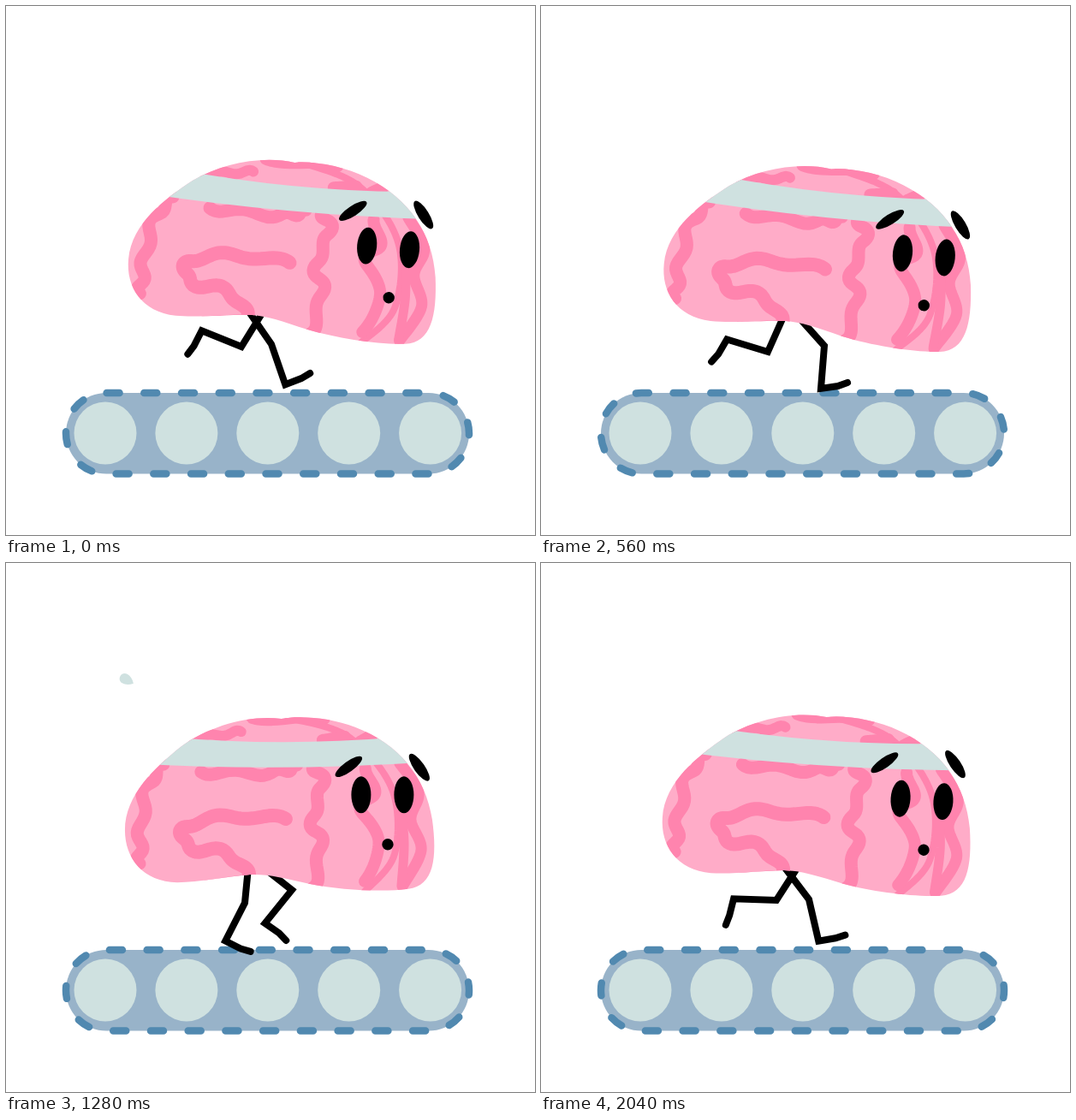
These frames come from a looping animation (618 px wide and 618 px high, 2080 ms). An HTML page with a canvas:

```html
<!DOCTYPE html>
<html>
<head>
<meta charset="utf-8">
<style>
html, body { margin: 0; width: 100%; height: 100%; overflow: hidden; background: #fff; }
canvas { display: block; width: 618px; height: 618px; }
</style>
</head>
<body>
<canvas id="stage" width="618" height="618"></canvas>
<script>
const ctx = document.getElementById('stage').getContext('2d');
const LOOP = 2080, STEP = 520, STRIDE = 1040, TICK = 40, RAD = Math.PI / 180;
const PINK = '#ffacc8', ROSE = '#ff84ae', PALE = '#cfe1e0', BLUE = '#98b3c9', DASH = '#5189b0';

function hermite(b, c, m0, m1, u) {
  const u2 = u * u, u3 = u2 * u;
  return b * (2 * u3 - 3 * u2 + 1) + m0 * (u3 - 2 * u2 + u) + c * (3 * u2 - 2 * u3) + m1 * (u3 - u2);
}

// Periodic smooth interpolation through rows of [time, ...values]
function track(rows, period, time) {
  const n = rows.length;
  const t = ((time % period) + period) % period;
  const at = i => {
    const wrap = Math.floor(i / n), row = rows[i - wrap * n];
    return [row[0] + wrap * period, ...row.slice(1)];
  };
  let i = n - 1;
  while (rows[i][0] > t) i--;
  const [a, b, c, d] = [at(i - 1), at(i), at(i + 1), at(i + 2)];
  const span = c[0] - b[0];
  return b.slice(1).map((v, k) => {
    const j = k + 1;
    const m0 = (c[j] - a[j]) / (c[0] - a[0]) * span;
    const m1 = (d[j] - b[j]) / (d[0] - b[0]) * span;
    return hermite(v, c[j], m0, m1, (t - b[0]) / span);
  });
}

function ellipse(x, y, rx, ry, color, angle = 0) {
  ctx.fillStyle = color;
  ctx.beginPath();
  ctx.ellipse(x, y, rx, ry, angle * RAD, 0, 7);
  ctx.fill();
}

// Body height, and how far the brows lag behind
const BOB = [[0, 0], [40, 7.5], [95, 12], [160, 9], [240, 0], [340, -6], [420, -6], [480, -2.5]];
const LAG = [[0, 0.8], [40, 0.62], [240, 0], [400, 0.75], [480, 1]];
const bob = t => track(BOB, STEP, t)[0];
const tilt = t => 2.3 + 3.7 * Math.cos((t - 52) / STEP * 2 * Math.PI);

// time, knee x, knee y, shin angle, foot angle
const LEG = [
  [0, 310, 395, 19, 111],
  [40, 313, 397, -4.6, 98],
  [140, 306, 403, -25.5, 90],
  [240, 279, 397, -27, 63],
  [340, 266, 388, -55, 25],
  [480, 257, 394, -92, -14],
  [520, 257, 398, -112, -27],
  [560, 265, 404, -107, -30],
  [660, 295, 406, -85, 5],
  [760, 316, 382, -39, 55],
  [880, 319, 374, -8, 80],
  [1000, 313, 393, 13, 100]
];

function drawLeg(t, dx) {
  const [kx, ky, shin, foot] = track(LEG, STRIDE, t);
  const bend = 14 * Math.cos((t - 130) / STRIDE * 2 * Math.PI);
  let x = kx + dx, y = ky;
  ctx.beginPath();
  ctx.moveTo(283 + dx, 356 + bob(t));
  ctx.lineTo(x, y);
  for (const [angle, size] of [[shin, 50], [foot, 20], [foot + bend, 12]]) {
    x += Math.sin(angle * RAD) * size;
    y += Math.cos(angle * RAD) * size;
    ctx.lineTo(x, y);
  }
  ctx.strokeStyle = '#000';
  ctx.lineWidth = 8;
  ctx.lineCap = 'round';
  ctx.lineJoin = 'miter';
  ctx.stroke();
}

// Treadmill
const BELT = { x: 70, y: 452, w: 471, h: 94.5, r: 47.2 };
const LENGTH = 2 * (BELT.w - BELT.h) + 2 * Math.PI * BELT.r;
const PITCH = LENGTH / 24;

function drawBelt(t) {
  const { x, y, w, h, r } = BELT;
  const mid = x + w / 2;
  ctx.beginPath();
  ctx.moveTo(mid, y);
  ctx.arcTo(x, y, x, y + h, r);
  ctx.arcTo(x, y + h, mid, y + h, r);
  ctx.arcTo(x + w, y + h, x + w, y, r);
  ctx.arcTo(x + w, y, mid, y, r);
  ctx.closePath();
  ctx.fillStyle = BLUE;
  ctx.fill();
  ctx.strokeStyle = DASH;
  ctx.lineWidth = 8.5;
  ctx.lineCap = 'round';
  ctx.lineJoin = 'round';
  ctx.setLineDash([15, PITCH - 15]);
  ctx.lineDashOffset = 2 - t / STEP * 2 * PITCH;
  ctx.stroke();
  ctx.setLineDash([]);
  for (let i = 0; i < 5; i++) ellipse(116 + i * 94.9, 499, 36.5, 36.5, PALE);
}

// Sweat drops
const DROPS = [
  { start: 150, life: 250, from: [280, 228], to: [135, 120], angle: 210 },
  { start: 620, life: 280, from: [433, 194], to: [556, 99], angle: -27 },
  { start: 1040, life: 250, from: [281, 214], to: [135, 133], angle: 209 },
  { start: 1520, life: 280, from: [433, 194], to: [545, 107], angle: -27 }
];
const TEAR = new Path2D('M-23 0C-14 -10 -4 -15 6 -15C15 -15 21 -8 21 0C21 8 15 15 6 15C-4 15 -14 10 -23 0Z');

function drawDrop({ start, life, from, to, angle }, t) {
  const u = (t - start) / life;
  if (u < 0 || u >= 1) return;
  const size = 1 - 0.65 * Math.max(0, (u - 0.5) / 0.5);
  const fade = Math.min(1, Math.max(0, (u - 0.6) / 0.3));
  const mix = (a, b) => Math.round(a + (b - a) * fade);
  ctx.save();
  ctx.translate(from[0] + (to[0] - from[0]) * u, from[1] + (to[1] - from[1]) * u);
  ctx.rotate(angle * RAD);
  ctx.scale(size, size);
  ctx.fillStyle = `rgb(${mix(152, 207)},${mix(179, 225)},${mix(201, 224)})`;
  ctx.fill(TEAR);
  ctx.restore();
}

// Brain
const BRAIN = new Path2D('M322 182C345 178 380 181 408 192C460 212 490 250 498 300' +
  'C504 345 500 377 470 381C440 385 390 382 355 375C325 368 305 363 285 364' +
  'C260 366 225 373 200 373C160 372 139 345 139 312C139 270 175 238 205 214C238 190 285 177 322 182Z');
const BAND = new Path2D('M190 203Q320 215 455 204L490 233Q320 244 150 234Z');

// Curve through a few points, with a sideways wobble
function fold(width, amp, waves, pts) {
  const last = pts.length - 1, path = new Path2D();
  const at = i => pts[Math.max(0, Math.min(last, i))];
  const spot = s => {
    const i = Math.min(last - 1, Math.floor(s));
    return [0, 1].map(k => hermite(at(i)[k], at(i + 1)[k],
      (at(i + 1)[k] - at(i - 1)[k]) / 2, (at(i + 2)[k] - at(i)[k]) / 2, s - i));
  };
  const steps = last * 16;
  for (let n = 0; n <= steps; n++) {
    const s = n / 16, [x, y] = spot(s);
    const [px, py] = spot(Math.max(0, s - 0.05)), [qx, qy] = spot(Math.min(last, s + 0.05));
    const dir = Math.atan2(qy - py, qx - px);
    const off = amp * Math.sin(n / steps * waves * 2 * Math.PI);
    path.lineTo(x - Math.sin(dir) * off, y + Math.cos(dir) * off);
  }
  return { width, path };
}

const FOLDS = [
  fold(15, 4, 3.5, [[184, 235], [164, 264], [157, 318], [156, 351]]),
  fold(15, 3, 3, [[228, 244], [310, 245], [340, 236]]),
  fold(15, 4, 4, [[360, 236], [370, 260], [358, 298], [368, 332], [358, 380]]),
  fold(16, 3, 5, [[327, 299], [262, 296], [210, 308], [214, 332], [258, 339], [284, 365]]),
  fold(12, 2, 2, [[218, 205], [275, 197]]),
  fold(14, 2, 1, [[288, 181], [372, 182]]),
  fold(8, 0, 0, [[330, 181], [400, 203], [451, 264], [454, 340], [418, 385]]),
  fold(14, 0, 0, [[370, 207], [396, 203]]),
  fold(14, 0, 0, [[414, 209], [428, 201]]),
  fold(14, 1.5, 3, [[420, 240], [430, 268], [414, 289], [437, 325], [419, 372]]),
  fold(13, 0, 0, [[460, 234], [482, 268], [473, 300], [485, 336], [463, 378]]),
  fold(11, 0, 0, [[459, 270], [465, 325], [462, 376]]),
  fold(5, 0, 0, [[232, 373], [290, 365]])
];

function drawBrain(t) {
  ctx.save();
  ctx.translate(320, 348 + bob(t));
  ctx.rotate(tilt(t) * RAD);
  ctx.translate(-320, -348);

  ctx.save();
  ctx.fillStyle = PINK;
  ctx.fill(BRAIN);
  ctx.clip(BRAIN);
  ctx.strokeStyle = ROSE;
  ctx.lineCap = ctx.lineJoin = 'round';
  for (const { width, path } of FOLDS) {
    ctx.lineWidth = width;
    ctx.stroke(path);
  }
  ctx.fillStyle = PALE;
  ctx.fill(BAND);
  ctx.restore();

  const lag = track(LAG, STEP, t)[0];
  ellipse(415, 271, 11.5, 21.5, '#000');
  ellipse(465, 271, 11.5, 21.5, '#000');
  ellipse(446, 329, 6.7, 6.7, '#000');
  ellipse(400.5 - 7 * lag, 238 - 7.5 * lag, 19, 6, '#000', -36 - 3 * lag);
  ellipse(483 - 7 * lag, 239 - 12.5 * lag, 19, 6.3, '#000', 55 - 3 * lag);
  ctx.restore();
}

function draw(t) {
  ctx.fillStyle = '#fff';
  ctx.fillRect(0, 0, 618, 618);
  drawBelt(t);
  DROPS.forEach(d => drawDrop(d, t));
  drawLeg(t + STEP, 18);
  drawLeg(t, 0);
  drawBrain(t);
}

const begin = performance.now();
function frame() {
  const t = (performance.now() - begin) % LOOP;
  draw(Math.floor(t / TICK) * TICK);
  requestAnimationFrame(frame);
}
frame();
</script>
</body>
</html>
```
